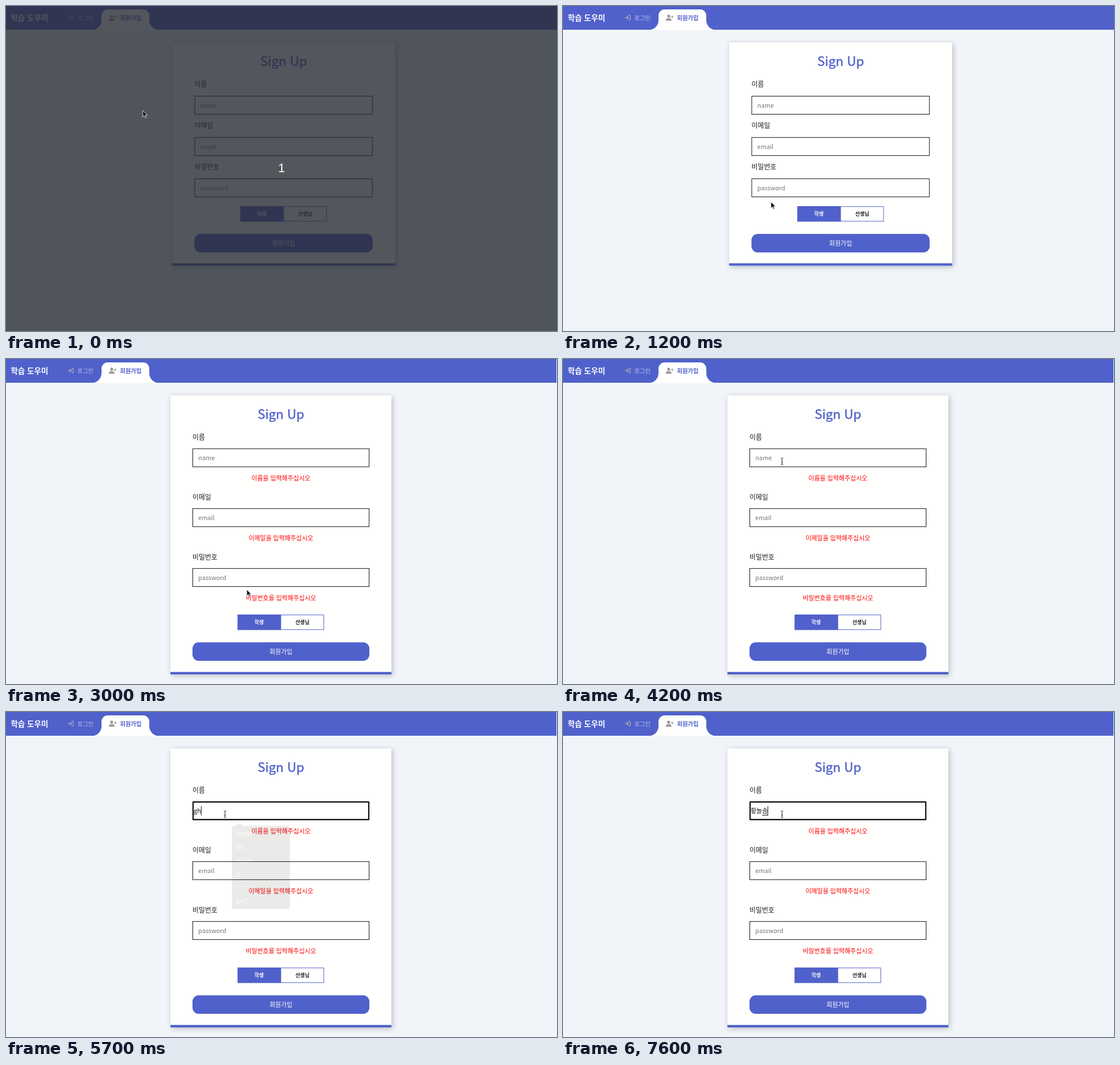
Animation of 975x575 px, one loop 8000 ms. Source, as an HTML page:

```html
<!DOCTYPE html>
<html lang="ko">
<head>
<meta charset="utf-8">
<title>Sign Up</title>
<style>
  html, body { margin: 0; width: 100%; height: 100%; overflow: hidden; background: #f1f5fa; }
  svg { display: block; width: 975px; height: 575px; }
  text { font-family: "Noto Sans CJK KR", "Noto Sans CJK JP", "Noto Sans CJK", "Noto Sans", sans-serif; white-space: pre; }
  .bold { font-weight: 700; }
  .mid { text-anchor: middle; }
  .ui text { font-family: "Liberation Sans", "Noto Sans CJK KR", "Noto Sans CJK JP", "Noto Sans CJK", sans-serif; }
  .card { filter: drop-shadow(2px 2px 5px rgba(0, 0, 0, .24)); }
  .popup { filter: drop-shadow(0 1px 2px rgba(0, 0, 0, .3)); }
</style>
</head>
<body>
<svg id="stage" viewBox="0 0 975 575" xmlns="http://www.w3.org/2000/svg"></svg>
<script>
const LOOP = 8000, TICK = 100;
const BLUE = '#5061cb', PAGE = '#f1f5fa', PAPER = '#fffffe', INK = '#1c1c1c';

const rect = (x, y, w, h, fill, more = '') =>
  `<rect x="${x}" y="${y}" width="${w}" height="${h}" fill="${fill}" ${more}/>`;
const label = (x, y, size, fill, str, cls = '', more = '') =>
  `<text x="${x}" y="${y}" font-size="${size}" fill="${fill}" class="${cls}" ${more}>${str}</text>`;

const FIELDS = [
  { title: '이름', hint: 'name', error: '이름을 입력해주십시오' },
  { title: '이메일', hint: 'email', error: '이메일을 입력해주십시오' },
  { title: '비밀번호', hint: 'password', error: '비밀번호를 입력해주십시오' },
];

function header(width) {
  return rect(0, 0, width, 42, BLUE)
    + `<path d="M152 42.3A17 17 0 0 0 169 25V17A11 11 0 0 1 180 6H242.500A11 11 0 0 1 253.500 17V25A17 17 0 0 0 270.500 42.300Z" fill="#fff"/>`
    + label(8.500, 25.500, 13.600, '#fff', '학습 도우미', 'bold')
    + `<path d="M109.500 20.500h6M113 17.500l3 3l-3 3M116 16.500h2q1.200 0 1.200 1.200v5.600q0 1.200-1.200 1.200h-2"
        fill="none" stroke="#a9a9ae" stroke-width="1.300"/>`
    + label(126.200, 24.500, 10.400, '#bcc2ea', '로그인')
    + `<g fill="#9b9b9b"><circle cx="187" cy="18" r="2.700"/>
        <path d="M182 26q0-4.600 3.700-4.600h2.600q3.700 0 3.700 4.600zM192.700 17.200v1.300h-1.700v1.200h1.700v1.700h1.200v-1.700h1.700v-1.200h-1.700v-1.700z"/></g>`
    + label(201.700, 24.500, 10.400, BLUE, '회원가입', 'bold');
}

function form(o) {
  const mid = o.x + o.w / 2;
  const rows = FIELDS.map((f, i) => {
    const y = i * o.step, top = o.box + y;
    return label(o.inner, 143 + y, 12, INK, f.title)
      + rect(o.inner + .5, top + .5, o.innerW - 1, 32, 'none', 'stroke="#111"')
      + label(o.inner + 10.300, top + 20.900, 11, '#757575', f.hint, '', `id="${o.id}-${f.hint}"`)
      + (o.errors ? label(mid, 215.200 + y, 11, '#f00', f.error, 'mid') : '');
  }).join('');
  return `<g id="${o.id}">` + header(o.headerW)
    + `<g class="card">${rect(o.x, 64.500, o.w, o.bottom - 64.500, PAPER)}</g>`
    + rect(o.x, o.bottom - 4.300, o.w, 4.300, BLUE)
    + label(mid, 105.800, 22.500, BLUE, 'Sign Up', 'mid', `stroke="${BLUE}" stroke-width=".45"`)
    + rows
    + rect(o.toggleX + .5, o.toggleY + .5, 152, 26, PAPER, `stroke="${BLUE}"`)
    + rect(o.toggleX, o.toggleY, 77, 27, BLUE)
    + label(o.toggleX + 38, o.toggleY + 16.200, 9, '#fff', '학생', 'mid bold')
    + label(o.toggleX + 114.700, o.toggleY + 16.200, 9, '#222', '선생님', 'mid bold')
    + rect(o.inner, o.button, o.innerW, 32.700, BLUE, 'rx="11"')
    + label(mid, o.button + 20.900, 11, '#fff', '회원가입', 'mid')
    + '</g>';
}

const POPUP_ITEMS = ['박버퍼', 'jbn', 'editor', 'a', 'ㅁ', 'jbn2'];
const popup = `<g id="popup" class="popup ui">
  <path d="M404 198.500l6-5q1.300-1 2.600 0l6 5z" fill="#222"/>`
  + rect(397.500, 198, 107, 153.500, '#222', 'rx="3"')
  + POPUP_ITEMS.map((s, i) => label(405.700, 217 + i * 24.700, 11, '#e8e8e8', s)).join('') + '</g>';

const cursors = `<g id="arrow"><path d="M0 0V11.300L2.600 8.900L4.400 13L6.300 12.200L4.500 8.200H8.200Z"
    fill="#111" stroke="#fff" stroke-width=".8"/></g>
  <g id="hand"><path d="M2.800 1.300Q3.800 0 4.900 1.300V5L9.300 6Q10.700 6.600 10.300 8.500L9.500 12.600H4.200L.8 8.600Q.5 7 2 7.200L2.800 7.800Z"
    fill="#111" stroke="#fff" stroke-width=".9"/></g>
  <g id="beam" fill="none">${[['#fff', 2], ['#222', 1]].map(([c, w]) =>
    `<path d="M-2-6Q0-6 0-4.500Q0-6 2-6M0-4.500V4.500M-2 6Q0 6 0 4.500Q0 6 2 6M-1.200 2h2.400" stroke="${c}" stroke-width="${w}"/>`).join('')}</g>`;

document.getElementById('stage').innerHTML = rect(0, 0, 975, 575, PAGE)
  + form({ id: 'plain', headerW: 975, x: 294, w: 394.700, bottom: 459.500, inner: 333.500, innerW: 315.300,
           box: 159, step: 73.100, toggleX: 414.700, toggleY: 354.300, button: 403.200 })
  + form({ id: 'invalid', headerW: 974, x: 291, w: 391, bottom: 558, inner: 330, innerW: 313,
           box: 158.300, step: 105.900, toggleX: 409.800, toggleY: 452.300, button: 501.200, errors: true })
  + `<g id="focus">${rect(331, 159.200, 311, 31, 'none', 'rx="1.5" stroke="#000" stroke-width="2"')}
      ${label(332, 179.300, 11, '#111', '', '', 'id="typed"')}
      ${rect(0, 182, 10, 1, '#111', 'id="underline"')}
      ${rect(0, 166.500, 1, 16.500, '#111', 'id="caret"')}</g>`
  + popup
  + `<g id="countdown" class="ui">${rect(0, 0, 975, 575, '#282c34', 'opacity=".8"')}
      ${label(487.500, 294.300, 22, '#fffff0', '1', 'mid')}</g>`
  + cursors;

const el = id => document.getElementById(id);
const show = (id, on) => el(id).setAttribute('display', on ? 'inline' : 'none');
const latest = (list, t) => list.reduce((found, item) => item[0] <= t ? item : found);

// [time, cursor, x, y]
const POINTER = [
  [1600, 'hand', 414, 410], [1700, 'hand', 416, 415], [1900, 'hand', 418, 417],
  [2000, 'hand', 417, 419], [2200, 'hand', 419.500, 419], [2400, 'beam', 424, 419],
  [3000, 'arrow', 426, 408], [3100, 'beam', 429, 383], [3200, 'arrow', 432, 335],
  [3300, 'beam', 430, 288], [3400, 'arrow', 416, 242], [3500, 'arrow', 398, 204],
  [3600, 'beam', 387.500, 182], [4200, 'beam', 387.500, 181],
];

// [time, text, composing]
const TYPING = [
  [0, ''], [5500, 'g'], [5600, 'gh'], [6100, ''],
  [6500, 'ㅎ', 1], [6600, '호', 1], [6700, '화', 1], [7000, '황', 1], [7100, '황느', 1],
  [7200, '황늘', 1], [7300, '황늘ㅅ', 1], [7400, '황늘소', 1], [7600, '황늘솜', 1],
];

// [time, opacity, scale]
const POPUP = [[0, 0, 1], [5500, 1, 1], [5600, .5, .98], [5700, .09, .955], [5800, 0, 1]];

function pointerAt(t) {
  if (t >= 1600) return latest(POINTER, t);
  const u = Math.min(1, Math.max(0, (t - 600) / 900));
  const e = u * u * (3 - 2 * u);
  return [t, 'arrow', 242 + 170 * e, 185 + 218 * e];
}

function render(time) {
  const t = Math.floor(time / TICK) * TICK;
  const invalid = t >= 2400, focused = t >= 4500;
  show('countdown', t < 100);
  show('plain', !invalid);
  show('invalid', invalid);
  show('focus', focused);

  const [, kind, x, y] = pointerAt(t);
  for (const id of ['arrow', 'hand', 'beam']) show(id, id === kind);
  el(kind).setAttribute('transform', `translate(${x} ${y})`);

  const [, text, composing] = latest(TYPING, t);
  const typed = el('typed');
  typed.textContent = text;
  const end = 332 + (text && focused ? typed.getComputedTextLength() : 0);
  show('invalid-name', !text);
  show('caret', t < 4900 || t >= 5500);
  el('caret').setAttribute('x', Math.round(end));
  show('underline', composing);
  el('underline').setAttribute('x', end - 10.100);

  const [, opacity, scale] = latest(POPUP, t);
  show('popup', opacity > 0);
  el('popup').setAttribute('opacity', opacity);
  el('popup').setAttribute('transform', `translate(451 274.800) scale(${scale}) translate(-451 -274.800)`);
}

const start = performance.now();
function frame() {
  render((performance.now() - start) % LOOP);
  requestAnimationFrame(frame);
}
frame();
</script>
</body>
</html>
```
